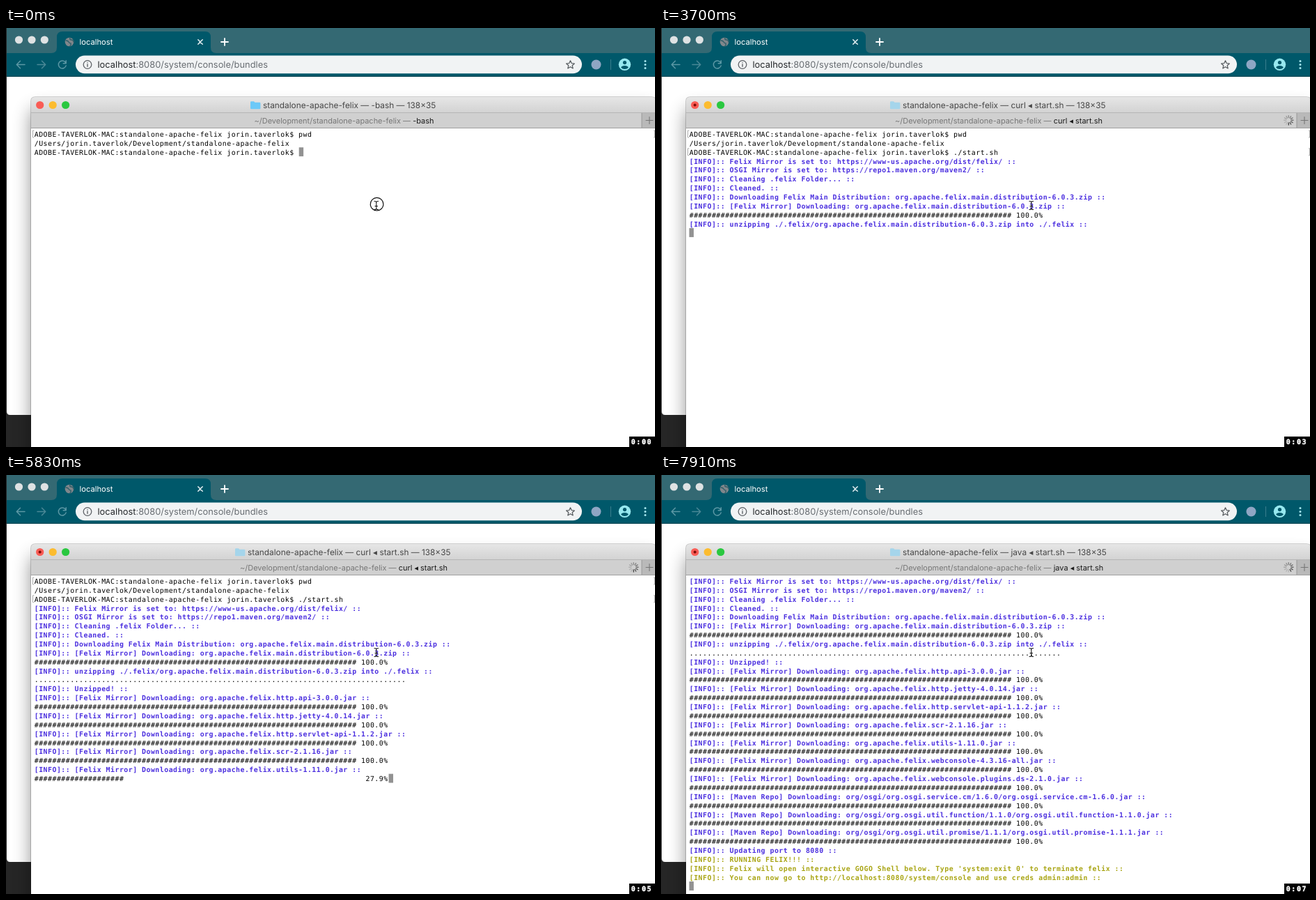
Recreate the animation shown at these times as an HTML page. Size 932 by 601 pixels, loop 8000 ms.

```html
<!DOCTYPE html>
<html lang="en">
<head>
<meta charset="utf-8">
<title>Felix start script</title>
<style>
  html, body { margin: 0; width: 100%; height: 100%; overflow: hidden; background: #262626; }
  svg { display: block; width: 100%; height: 100%; overflow: hidden; }
  text { font-family: Inter, "DejaVu Sans", sans-serif; white-space: pre; text-rendering: geometricPrecision; }
  #rows text { font: 9.9px "DejaVu Sans Mono", monospace; letter-spacing: .484px; fill: #000; }
  #rows text.info { font-weight: 700; fill: #4b2fdf; }
  #rows text.note { font-weight: 700; fill: #a9a514; }
  #clock { font: 700 10px "DejaVu Sans Mono", monospace; letter-spacing: 1.6px; fill: #fff; stroke: #fff; stroke-width: .4px; }
  .line { fill: none; stroke-linecap: round; stroke-linejoin: round; }
</style>
</head>
<body>
<svg viewBox="0 0 932 601">
  <defs>
    <linearGradient id="bar" x2="0" y2="1"><stop stop-color="#e6e6e6"/><stop offset="1" stop-color="#d2d2d2"/></linearGradient>
    <filter id="blur" x="-10%" y="-10%" width="120%" height="120%"><feGaussianBlur stdDeviation="13.5"/></filter>
  </defs>

  <rect width="932" height="601" fill="#262626"/>
  <path d="M1 0H932V555H6Q1 555 1 550Z" fill="#fff"/>
  <rect x="1" width="931" height="37" fill="#346973"/>
  <rect x="1" y="36" width="931" height="33" fill="#00586a"/>
  <rect x="1" y="69" width="931" height="1" fill="#0b4451"/>
  <path d="M65 36Q73 36 73 28V13Q73 5 81 5H286Q294 5 294 13V28Q294 36 302 36Z" fill="#00586a"/>
  <g fill="#dfe2e3">
    <circle cx="18.5" cy="17" r="5.6"/><circle cx="37" cy="17" r="5.6"/><circle cx="55.3" cy="17" r="5.6"/>
  </g>
  <circle cx="91" cy="20" r="6.3" fill="#80868b"/>
  <path d="M86 18q3 0 4 2t3 2q1 2-1 4M92 14q-1 3 2 3t3 3" class="line" stroke="#2f5f69" stroke-width="1.5"/>
  <text x="105.5" y="24" font-size="11.2" fill="#fff">localhost</text>
  <path d="M275.8 16.8l6.4 6.4m0-6.4l-6.4 6.4" class="line" stroke="#e6f1f3" stroke-width="1.5"/>
  <path d="M309 20h10m-5-5v10" class="line" stroke="#fff" stroke-width="1.8"/>
  <g class="line" stroke-width="1.5">
    <path d="M27 52.5H15.5m5-5.2l-5.2 5.2 5.2 5.2" stroke="#5c98a5"/>
    <path d="M45 52.5h11.5m-5-5.2l5.2 5.2-5.2 5.2" stroke="#4a8896"/>
    <path d="M85.4 49.3a5.5 5.5 0 1 0 .8 4.6M86.2 46.8v3.9h-4" stroke="#5c98a5"/>
  </g>
  <rect x="100" y="39.5" width="727" height="25.7" rx="12.85" fill="#f1f3f4"/>
  <circle cx="117" cy="52.5" r="5.8" class="line" stroke="#5f6368" stroke-width="1.3"/>
  <path d="M117 52v3.2M117 49.6v.1" class="line" stroke="#5f6368" stroke-width="1.4"/>
  <text x="131.5" y="57.2" font-size="12.86" fill="#25282b">localhost<tspan fill="#686d72">:8080/system/console/bundles</tspan></text>
  <path d="M810.5 46.8l1.7 3.8 4.2.4-3.2 2.8 1 4.1-3.7-2.2-3.7 2.2 1-4.1-3.2-2.8 4.2-.4Z" class="line" stroke="#55595d" stroke-width="1.2"/>
  <circle cx="847.5" cy="52.5" r="7" fill="#8fa6c4"/>
  <rect x="868" y="45" width="1" height="15" fill="#3b7f8d"/>
  <circle cx="888.5" cy="52.3" r="8.7" fill="#97e8ef"/>
  <circle cx="888.5" cy="49.6" r="2.6" fill="#00586a"/>
  <path d="M883.2 56.8q1-2.7 5.3-2.7t5.3 2.7q-2 2.3-5.3 2.3t-5.3-2.3Z" fill="#00586a"/>
  <g fill="#a5e6ee">
    <circle cx="918" cy="47.5" r="1.5"/><circle cx="918" cy="52.5" r="1.5"/><circle cx="918" cy="57.5" r="1.5"/>
  </g>

  <rect x="36" y="117" width="897" height="520" rx="6" opacity=".43" filter="url(#blur)"/>
  <path d="M36 602V105Q36 99 42 99H927Q933 99 933 105V602Z" fill="#fff" stroke="#000" stroke-opacity=".22" stroke-width="1.6"/>
  <path d="M36 122V105Q36 99 42 99H927Q933 99 933 105V122Z" fill="url(#bar)"/>
  <path d="M36 144H933V602H36Z" fill="#fff"/>
  <rect x="36" y="121" width="897" height="22" fill="#d0d0d0"/>
  <rect x="36" y="121" width="897" height="1" fill="#b5b5b5"/>
  <rect x="913" y="122" width="20" height="21" fill="#b9b9b9"/>
  <rect x="912.5" y="122" width="1" height="21" fill="#989898"/>
  <rect x="36" y="143" width="897" height="1" fill="#a0a0a0"/>
  <path d="M919 132.5h10m-5-5v10" class="line" stroke="#767676" stroke-width="1.1"/>
  <circle cx="48.7" cy="110.5" r="5.6" fill="#f95c55"/>
  <circle cx="67.2" cy="110.5" r="5.6" fill="#fcbc2f"/>
  <circle cx="85.6" cy="110.5" r="5.6" fill="#2ac840"/>
  <circle id="busy" cx="48.7" cy="110.5" r="2" fill="#7c0d08"/>
  <path id="folder" d="M0 1.2Q0 0 1.2 0H5l1.4 1.4h6.8Q14.4 1.4 14.4 2.6V9.8Q14.4 11 13.2 11H1.2Q0 11 0 9.8Z"/>
  <text id="title" y="115" font-size="11.85" fill="#474747"></text>
  <text id="tab" y="136.7" font-size="10.98" fill="#777"><tspan></tspan><tspan fill="#1c1c1c"></tspan></text>
  <g id="spin" stroke="#4c4c4c" stroke-width="1.4" stroke-linecap="round"></g>
  <g id="marks" class="line" stroke="#aaa"></g>
  <rect id="cursor" width="6.45" height="12.87" fill="#929292"/>
  <g id="rows"></g>
  <circle id="click" cx="532.6" cy="252.7" r="9.3" class="line" stroke="#111" stroke-width="1.2"/>
  <path d="M529 248.5q2.8 0 2.8 1.6 0-1.6 2.8-1.6M531.8 249.5v10M529 260.5q2.8 0 2.8-1.6 0 1.6 2.8 1.6M530 255.5h3.6" class="line" stroke="#111" stroke-width="1.1"/>
  <rect x="895" y="586" width="37" height="15" fill="#000"/>
  <text id="clock" x="897.7" y="597"></text>
</svg>
<script>
const LOOP = 8000, ROWS = 35, CHAR = 6.444, PITCH = 12.87, LEFT = 40.5, TOP = 145.5;
const NS = 'http://www.w3.org/2000/svg';
const $ = id => document.getElementById(id);
const add = (parent, tag, attrs = {}) => {
  const el = document.createElementNS(NS, tag);
  for (const k in attrs) el.setAttribute(k, attrs[k]);
  return parent.appendChild(el);
};
// value of the last [time, value] step that has begun
const at = (steps, t, none = '') => {
  let v = none;
  for (const [time, value] of steps) if (time <= t) v = value;
  return v;
};
const show = (el, on) => el.setAttribute('visibility', on ? 'visible' : 'hidden');

const seconds = [950, 1930, 2920, 3890, 4870, 5920, 7080];
const typed = [[590, '.'], [770, './'], [1570, './s'], [1660, './st'], [2200, './start.sh']];
const jobs = [[0, '-bash'], [2920, 'curl ◂ start.sh'], [7710, 'java ◂ start.sh']];
const prompt = 'ADOBE-TAVERLOK-MAC:standalone-apache-felix jorin.taverlok$ ';

const log = [];
const put = (t, text, kind = '') => log.push({ t, text: typeof text === 'string' ? () => text : text, kind });
const info = (t, text, kind = 'info') => put(t, `[INFO]:: ${text} ::`, kind);
const meter = p => '#'.repeat(Math.floor(p * .72)).padEnd(72) + p.toFixed(1).padStart(6) + '%';
const fetchFile = (t, repo, file, ...steps) => {
  info(t, `[${repo}] Downloading: ${file}`);
  put(t, now => {
    const p = at(steps, now, -1);
    return p < 0 ? '' : meter(p);
  });
};
const felix = (t, name, ...steps) => fetchFile(t, 'Felix Mirror', `org.apache.felix.${name}`, ...steps);
const osgi = (t, name, version, ...steps) =>
  fetchFile(t, 'Maven Repo', `org/osgi/org.osgi.${name}/${version}/org.osgi.${name}-${version}.jar`, ...steps);

put(0, prompt + 'pwd');
put(0, '/Users/jorin.taverlok/Development/standalone-apache-felix');
put(0, t => prompt + at(typed, t));
info(2920, 'Felix Mirror is set to: https://www-us.apache.org/dist/felix/');
info(2920, 'OSGI Mirror is set to: https://repo1.maven.org/maven2/');
info(2920, 'Cleaning .felix Folder...');
info(3010, 'Cleaned.');
info(3010, 'Downloading Felix Main Distribution: org.apache.felix.main.distribution-6.0.3.zip');
felix(3010, 'main.distribution-6.0.3.zip', [3350, 4.6], [3530, 52.3], [3620, 100]);
info(3620, 'unzipping ./.felix/org.apache.felix.main.distribution-6.0.3.zip into ./.felix');
put(3710, '.'.repeat(83));
info(3710, 'Unzipped!');
felix(3710, 'http.api-3.0.0.jar', [3980, 100]);
felix(4060, 'http.jetty-4.0.14.jar', [4330, 22.4], [4420, 71.8], [4510, 100]);
felix(4510, 'http.servlet-api-1.1.2.jar', [4870, 100]);
felix(4960, 'scr-2.1.16.jar', [5210, 33.6], [5300, 100]);
felix(5390, 'utils-1.11.0.jar', [5830, 27.9], [5920, 100]);
felix(5920, 'webconsole-4.3.16-all.jar', [6100, 24.1], [6190, 100]);
felix(6190, 'webconsole.plugins.ds-2.1.0.jar', [6450, 100]);
osgi(6450, 'service.cm', '1.6.0', [6720, 100]);
osgi(6720, 'util.function', '1.1.0', [6990, 100]);
osgi(7170, 'util.promise', '1.1.1', [7530, 100]);
info(7620, 'Updating port to 8080');
info(7710, 'RUNNING FELIX!!!', 'note');
info(7710, "Felix will open interactive GOGO Shell below. Type 'system:exit 0' to terminate felix", 'note');
info(7710, 'You can now go to http://localhost:8080/system/console and use creds admin:admin', 'note');

const rows = Array.from({ length: ROWS }, (_, i) => add($('rows'), 'text', { x: LEFT + .25, y: TOP + 10.4 + i * PITCH }));
const marks = [0, 2].map(() => add($('marks'), 'path'));
const spokes = Array.from({ length: 12 }, (_, i) =>
  add($('spin'), 'path', { d: 'M901.3 128.6v-3', transform: `rotate(${i * 30} 901.3 132.3)` }));

function drawTerminal(t) {
  const lines = log.filter(l => l.t <= t);
  const last = lines[lines.length - 1];
  const cursorRow = lines.length - (last.kind ? 0 : 1);
  const skip = Math.max(0, cursorRow + 1 - ROWS);
  rows.forEach((el, i) => {
    const l = lines[i + skip], text = l ? l.text(t) : '';
    if (el.textContent !== text) el.textContent = text;
    el.setAttribute('class', l ? l.kind : '');
  });
  const col = last.kind ? 0 : last.text(t).length;
  $('cursor').setAttribute('x', LEFT + col * CHAR);
  $('cursor').setAttribute('y', TOP + (cursorRow - skip) * PITCH);
  marks.forEach((m, i) => {
    const row = i * 2 - skip, y = TOP + 1.5 + row * PITCH;
    m.setAttribute('d', `M40 ${y}h-1.5v10h1.5M930.5 ${y}h1v10h-1`);
    show(m, row >= 0 && (i === 0 || t >= 2200));
  });
}

function drawTitle(t) {
  const job = at(jobs, t), idle = t < 2920;
  $('title').setAttribute('x', idle ? 369 : 347);
  $('title').textContent = `standalone-apache-felix — ${job} — 138×35`;
  $('tab').setAttribute('x', idle ? 356.5 : 336);
  $('tab').children[0].textContent = '~/Development/standalone-apache-felix — ';
  $('tab').children[1].textContent = job;
  $('folder').setAttribute('transform', `translate(${idle ? 351 : 329} 105.3)`);
  $('folder').setAttribute('fill', idle ? '#6cc9f8' : '#a5d5eb');
  show($('busy'), !idle);
}

function drawSpinner(t) {
  show($('spin'), t >= 3530);
  const head = Math.floor((t - 3530) / 89.5) + 5;
  spokes.forEach((s, i) => {
    const age = (((head - i) % 12) + 12) % 12;
    s.setAttribute('opacity', Math.max(.2, 1 - age * .085));
  });
}

const start = performance.now();
function frame() {
  const t = (performance.now() - start) % LOOP;
  drawTitle(t);
  drawTerminal(t);
  drawSpinner(t);
  show($('click'), t < 90);
  $('clock').textContent = '0:0' + seconds.filter(s => s <= t).length;
  requestAnimationFrame(frame);
}
frame();
</script>
</body>
</html>
```
